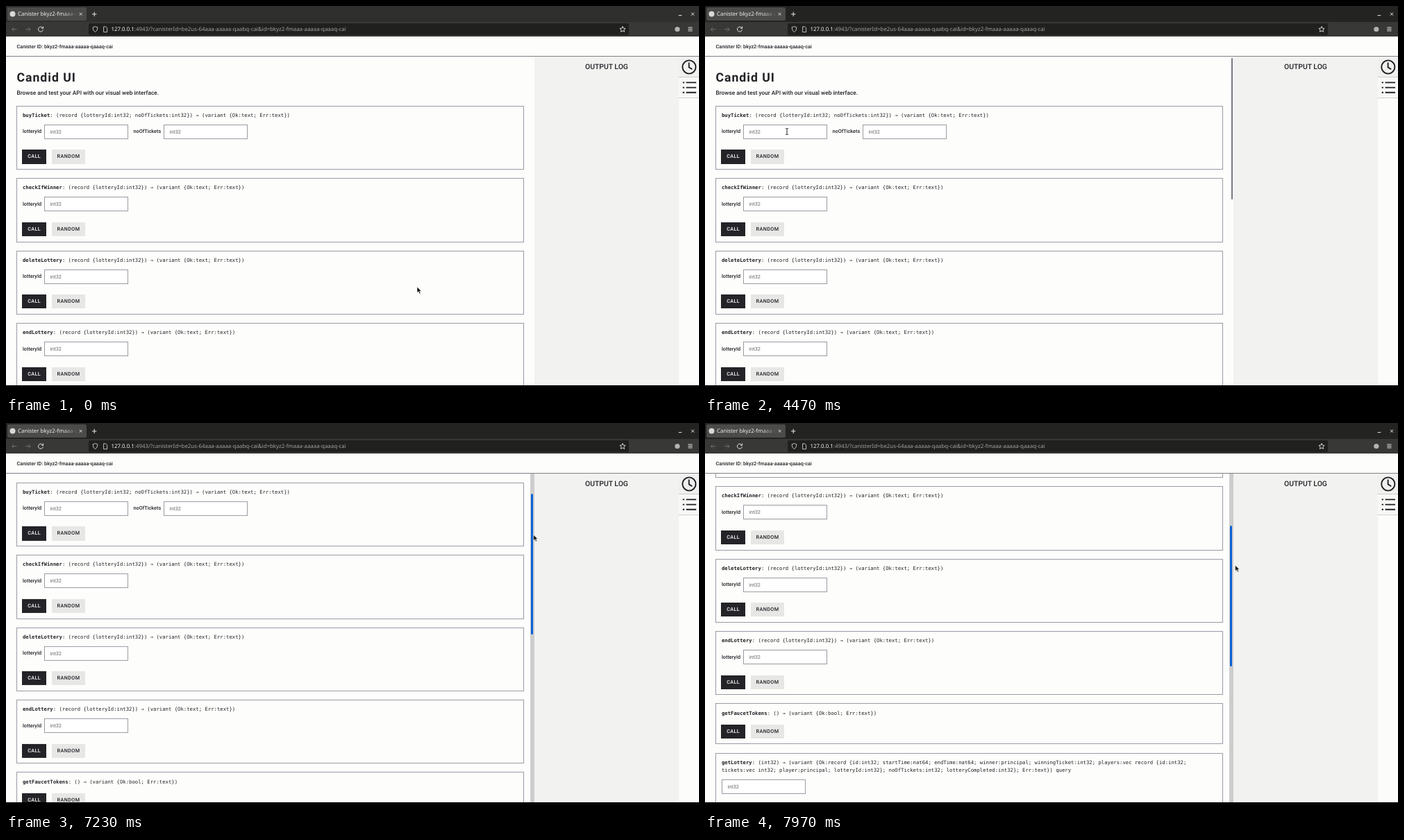
An HTML page for the animation above (8 s loop, 998x561 px).

```html
<!DOCTYPE html>
<html lang="en">
<head>
<meta charset="utf-8">
<title>Candid UI</title>
<style>
html, body { margin: 0; width: 100%; height: 100%; overflow: hidden; background: #000; }
#stage { position: absolute; left: 0; top: 0; width: 998px; height: 561px; overflow: hidden; background: #000;
  font: 500 7.28px/10px Roboto, sans-serif; color: #222226; text-rendering: geometricPrecision; white-space: nowrap; }
#stage div, #stage span.at, svg { position: absolute; box-sizing: border-box; }

/* browser frame */
.tabs { left: 0; top: 0; width: 998px; height: 23px; animation: focus 8s linear infinite; }
.tab { left: 2px; top: 2px; width: 114px; height: 19px; border-radius: 2px; background: #4b4b49; }
.bar { left: 0; top: 23px; width: 998px; height: 21px; background: #383836; }
.url { left: 119px; top: 2px; width: 778px; height: 17px; border-radius: 2px; background: #20201f; }
.ui { font: 400 7.87px/10px "Noto Sans", sans-serif; color: #a3a3a1; }
.ui b { font-weight: 400; color: #f5f5f3; }
.name { left: 15px; top: 5px; width: 86px; overflow: hidden; color: #f0f0ee;
  -webkit-mask: linear-gradient(90deg, #000 75%, transparent); mask: linear-gradient(90deg, #000 75%, transparent); }
@keyframes focus { 0%, 35.4% { background: #2f2f2e } 38.4%, 100% { background: #232322 } }

/* page */
.head { left: 0; top: 44px; width: 998px; height: 29px; background: #fdfdfc; border-bottom: 1px solid #808085; }
.page { left: 0; top: 73px; width: 761px; height: 474px; overflow: hidden; background: #fdfdfc; }
.scroll { left: 0; top: -73px; width: 761px; height: 1000px; animation: scroll 8s linear infinite; }
.log { left: 761px; top: 73px; width: 208px; height: 474px; background: #f2f2f0; text-align: center; font-size: 10.4px; line-height: 29px; }
.side { left: 969px; top: 73px; width: 29px; height: 474px; background: #fcfcfb; }
.cell { left: 0; width: 29px; height: 30px; border-bottom: 1px dotted #aaa; background: #f0f0ef; }
h1 { position: absolute; left: 15.5px; top: 94px; margin: 0; font-size: 17.6px; line-height: 20px; font-weight: 700; letter-spacing: 1px; }
.lead { left: 15.5px; top: 120.7px; font-size: 8.32px; }

.box { left: 15px; width: 731px; border: 1px solid #9a9aa3; }
.sig { left: 8px; top: 8.2px; width: 713px; white-space: normal; font: 400 7.277px/10.9px "DejaVu Sans Mono", monospace; }
.field { width: 121px; height: 21px; border: 1px solid #9a9aa3; padding-left: 7.6px; line-height: 19px; font-weight: 400; color: #66666a; background: #fff; }
.btn { height: 20.3px; line-height: 20.3px; text-align: center; letter-spacing: .4px; }
.call { left: 7.4px; width: 34.6px; background: #242428; color: #fff; }
.rand { left: 50px; width: 48px; background: #e7e7e6; }

/* scrollbar */
.thin { left: 758px; top: 75px; width: 2px; height: 204px; border-radius: 1px; background: #77777f; animation: thin 8s step-end infinite; }
.track { left: 755px; top: 73px; width: 6px; height: 474px; background: #cdcdcd; animation: track 8s step-end infinite; }
.thumb { left: 1px; top: 2px; width: 3px; height: 203px; border-radius: 1.5px;
  animation: drag 8s linear infinite, tint 8s step-end infinite; }
@keyframes scroll { 0%, 83.75% { transform: none } 90.375% { transform: translateY(-58px) } 96.625% { transform: translateY(-108.5px) } 99.625%, 100% { transform: translateY(-157px) } }
@keyframes drag { 0%, 83.75% { transform: none } 90.375% { transform: translateY(27px) } 96.625% { transform: translateY(50.2px) } 99.625%, 100% { transform: translateY(73px) } }
@keyframes thin { 0% { opacity: 0 } 40.6% { opacity: 1 } 75.4% { opacity: 0 } }
@keyframes track { 0% { opacity: 0 } 75.4% { opacity: 1 } }
@keyframes tint { 0% { background: #4e4e52 } 83.75% { background: #0b62d6 } }

/* pointer */
.mouse { left: 0; top: 0; width: 0; height: 0; animation: move 8s linear infinite; }
.mouse svg { overflow: visible; left: 0; top: 0; width: 1px; height: 1px; }
.arrow { animation: arrow 8s step-end infinite; }
.beam { animation: beam 8s step-end infinite; }
@keyframes arrow { 0% { opacity: 1 } 52% { opacity: 0 } 57.5% { opacity: 1 } }
@keyframes beam { 0% { opacity: 0 } 52% { opacity: 1 } 57.5% { opacity: 0 } }
@keyframes move {
  0%, 6% { transform: translate(592px, 405px) }
  7.875%, 10.2% { transform: translate(474px, 472px) }
  11.25%, 40.2% { transform: translate(467px, 500px) }
  42.5%, 45.2% { transform: translate(306px, 330px); animation-timing-function: ease-out }
  55.4%, 55.9% { transform: translate(118px, 181px) }
  57.5% { transform: translate(150px, 190px) }
  60.5% { transform: translate(460px, 138px) }
  63% { transform: translate(710px, 90px) }
  65.4%, 67% { transform: translate(763px, 138px) }
  67.5%, 71.5% { transform: translate(763px, 130px) }
  73.4%, 75.3% { transform: translate(764px, 126px) }
  80.4%, 83.75% { transform: translate(760px, 130px) }
  90.375% { transform: translate(759.5px, 161px) }
  96.625% { transform: translate(763px, 186px) }
  99.625%, 100% { transform: translate(763.5px, 205px) }
}
</style>
</head>
<body>
<div id="stage">
  <div class="tabs">
    <div class="tab ui">
      <div class="name">Canister bkyz2-fmaaa-aaaaa-qaaaq-cai</div>
    </div>
  </div>
  <div class="bar">
    <div class="url ui"><span class="at" style="left:32.5px;top:3.5px"><b>127.0.0.1</b>:4943/?canisterId=be2us-64aaa-aaaaa-qaabq-cai&amp;id=bkyz2-fmaaa-aaaaa-qaaaq-cai</span></div>
  </div>
  <svg width="998" height="44" fill="none" stroke="#e8e8e6" style="left:0;top:0">
    <circle cx="9.5" cy="11.5" r="4" fill="#d9d9d7" stroke="none"/>
    <path d="M105.8 9.8l3.6 3.6m0-3.6l-3.6 3.6M124 11.8h6.4m-3.2-3.2v6.4M968.6 13.6h4.6M987 9.6l4 4m0-4l-4 4"/>
    <path d="M15.5 33.6h-7m3-3l-3 3 3 3M28 33.6h7m-3-3l3 3-3 3" stroke="#70706e"/>
    <path d="M53 31.8a3.5 3.5 0 1 0 .4 2.6M53.6 29.6v2.6h-2.6"/>
    <path d="M128.5 29.6l3.4 1.1q.1 5-3.4 7-3.5-2-3.4-7zM140.6 29.8h3l2 2v5.8h-5z" stroke="#d0d0ce" stroke-width=".9"/>
    <path d="M888 29.4l1.2 2.7 2.9.3-2.2 2 .7 2.9-2.6-1.5-2.6 1.5.7-2.9-2.2-2 2.9-.3z" stroke-width=".9"/>
    <circle cx="966.8" cy="33.5" r="3.6" fill="#b4b4b2" stroke="none"/>
    <path d="M982.3 31h6.2m-6.2 2.4h6.2m-6.2 2.4h6.2"/>
  </svg>

  <div class="head"><span class="at" style="left:15.5px;top:9.7px">Canister ID: bkyz2-fmaaa-aaaaa-qaaaq-cai</span></div>
  <div class="page">
    <div class="scroll" id="list">
      <h1>Candid UI</h1>
      <div class="lead">Browse and test your API with our visual web interface.</div>
    </div>
  </div>
  <div class="log">OUTPUT LOG</div>
  <div class="side">
    <div class="cell" style="top:0"></div>
    <div class="cell" style="top:30px;background:#f8f8f7"></div>
    <svg width="29" height="60" fill="none" stroke="#1f1f22" stroke-width="1.9" style="left:0;top:0">
      <circle cx="14.8" cy="15" r="9.6"/>
      <path d="M14.6 8.6v6.8l4.6 2.8M10.5 37.4h14.5M10.5 44.6h14.5M10.5 51.8h14.5M5.6 37.4h2.4M5.6 44.6h2.4M5.6 51.8h2.4"/>
    </svg>
  </div>
  <div class="thin"></div>
  <div class="track"><div class="thumb"></div></div>
  <div class="mouse">
    <svg class="arrow"><path d="M0 0v8.6l2-1.8 1.5 3.3 1.6-.7-1.5-3.2h2.6z" fill="#111" stroke="#fff" stroke-width=".6"/></svg>
    <svg class="beam"><path d="M-2-4.3h1.4L0-3.8l.6-.5H2M0-3.8v7.6M-2 4.3h1.4L0 3.8l.6.5H2" fill="none" stroke="#222"/></svg>
  </div>
</div>
<script>
const list = document.getElementById('list');
const id = '(record {lotteryId:int32})', reply = '(variant {Ok:text; Err:text})';

const field = (x, y) => `<div class="field" style="left:${x}px;top:${y}px">int32</div>`;
const label = (text, x) => `<div style="left:${x}px;top:31.7px">${text}</div>`;
const buttons = y => `<div class="btn call" style="top:${y}px">CALL</div><div class="btn rand" style="top:${y}px">RANDOM</div>`;
const lottery = label('lotteryId', 8) + field(39, 26);

function method(top, height, name, type, body) {
  list.insertAdjacentHTML('beforeend',
    `<div class="box" style="top:${top}px;height:${height}px"><div class="sig"><b>${name}</b>: ${type}</div>${body}</div>`);
}

method(143.6, 92.6, 'buyTicket', `(record {lotteryId:int32; noOfTickets:int32}) → ${reply}`,
  lottery + label('noOfTickets', 167.5) + field(211, 26) + buttons(62.7));
['checkIfWinner', 'deleteLottery', 'endLottery'].forEach((name, i) =>
  method(248.1 + i * 104.4, 92.6, name, `${id} → ${reply}`, lottery + buttons(62.7)));
method(561.4, 59, 'getFaucetTokens', '() → (variant {Ok:bool; Err:text})', buttons(29.4));
method(632.6, 140, 'getLottery', '(int32) → (variant {Ok:record {id:int32; startTime:nat64; endTime:nat64; winner:principal; winningTicket:int32; players:vec record {id:int32; tickets:vec int32; player:principal; lotteryId:int32}; noOfTickets:int32; lotteryCompleted:int32}; Err:text}) query',
  field(8, 37) + buttons(73.7));
</script>
</body>
</html>
```
